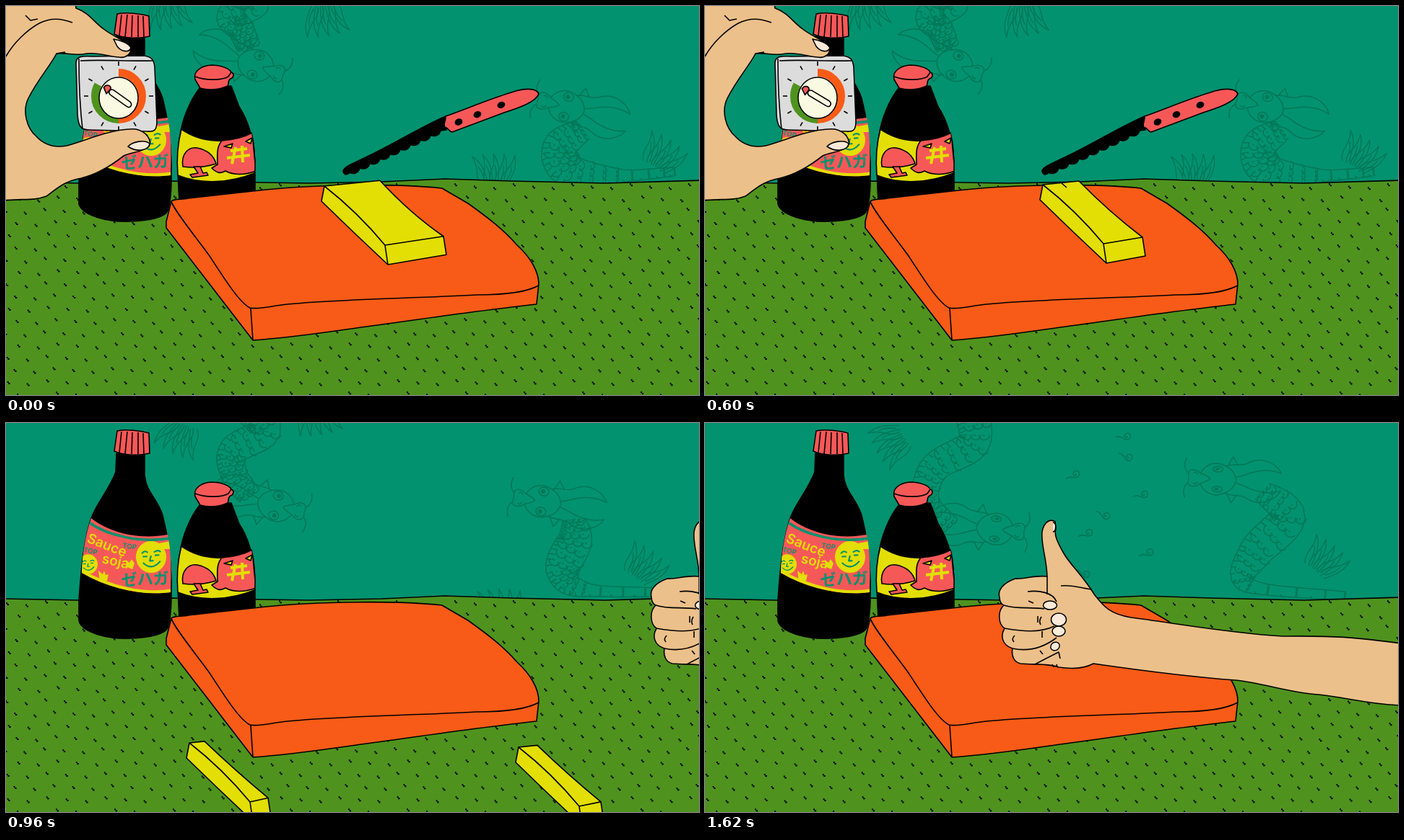
Animation of 960x540 px, one loop 1680 ms. Source, as an HTML page with a canvas:

```html
<!DOCTYPE html>
<html lang="en">
<head>
<meta charset="utf-8">
<title>Kitchen timer</title>
<style>
html, body { margin: 0; width: 100%; height: 100%; overflow: hidden; background: #02926f; }
canvas { display: block; }
</style>
</head>
<body>
<canvas id="stage" width="960" height="540"></canvas>
<script>
const c = document.getElementById('stage').getContext('2d');
const LOOP = 1680, STEP = 60, { PI, sin, cos } = Math;
const WALL = '#02926f', LINE = '#007757', GRASS = '#4f931e', ORANGE = '#f75b17', YELLOW = '#e3de03',
  RED = '#f65858', SKIN = '#ecc08a', GREY = '#dcdcdc', CREAM = '#fafae2', NAIL = '#f9e9d8', BLACK = '#000';

// Share of the span from a to b that has passed, 0 to 1
const part = (t, a, b) => Math.max(0, Math.min(1, (t - a) / (b - a)));

function paint(d, fill, stroke = BLACK, width = 1.6) {
  const p = new Path2D(d);
  if (fill) { c.fillStyle = fill; c.fill(p); }
  if (stroke) { c.strokeStyle = stroke; c.lineWidth = width; c.stroke(p); }
}
function oval(x, y, rx, ry, fill, stroke = BLACK, turn = 0) {
  c.beginPath();
  c.ellipse(x, y, rx, ry, turn, 0, 2 * PI);
  if (fill) { c.fillStyle = fill; c.fill(); }
  if (stroke) { c.strokeStyle = stroke; c.lineWidth = 1.5; c.stroke(); }
}
function group(x, y, turn, draw, scaleX = 1, scaleY = 1) {
  c.save();
  c.translate(x, y);
  c.rotate(turn);
  c.scale(scaleX, scaleY);
  draw();
  c.restore();
}
function word(text, x, y, turn, size, color, font = 'Inter, sans-serif') {
  group(x, y, turn, () => {
    c.font = `600 ${size}px ${font}`;
    c.fillStyle = color;
    c.fillText(text, 0, 0);
  });
}

// Poses: five spine points, then x, y, turn of the head and of one claw
const LEFT = {
  low: [300, -30, 345, -8, 312, 14, 325, 32, 335, 55, 346, 82, 3.5, 222, -8, 3],
  high: [368, -20, 372, 28, 318, 62, 306, 108, 335, 142, 402, 147, 3.25, 272, 20, 4.2],
  width: u => 24 - 8 * u
};
const RIGHT = {
  low: [800, 172, 768, 195, 780, 228, 845, 236, 925, 230, 776, 140, .25, 900, 220, .6],
  high: [772, 95, 808, 130, 762, 180, 752, 225, 885, 240, 710, 78, .05, 848, 202, .7],
  width: u => 14 + 14 * sin(PI * Math.min(1, u * 1.25)) - 8 * u
};

// Catmull-Rom curve through the spine points
function spine(p, u) {
  const i = Math.min(3, Math.floor(u * 4)), f = u * 4 - i;
  return [0, 1].map(k => {
    const [a, b, d, e] = [-1, 0, 1, 2].map(n => p[Math.max(0, Math.min(4, i + n)) * 2 + k]);
    return b + f / 2 * (d - a + f * (2 * a - 5 * b + 4 * d - e + f * (3 * (b - d) + e - a)));
  });
}
function body(p, width) {
  const edges = [new Path2D(), new Path2D()], N = 32;
  for (let i = 0; i <= N; i++) {
    const u = i / N, w = width(u), s = w / 3;
    const [x, y] = spine(p, u), [x0, y0] = spine(p, Math.max(0, u - .01)), [x1, y1] = spine(p, Math.min(1, u + .01));
    const turn = Math.atan2(y1 - y0, x1 - x0);
    edges.forEach((e, k) => e.lineTo(x + sin(turn) * w * (1 - 2 * k), y - cos(turn) * w * (1 - 2 * k)));
    group(x, y, turn, () => {
      c.beginPath();
      c.moveTo(0, w * .6);
      c.lineTo(3, w);
      c.stroke();
      if (i % 2) return;
      for (let k = 0; k < 3; k++) {
        const off = s * (k * 1.6 - 2 + (i % 4 ? .4 : -.2));
        c.beginPath();
        c.arc(0, off, s, -1.5, 1.5);
        c.stroke();
        c.fillRect(0, off, 2, 2);
      }
    });
  }
  edges.forEach(e => c.stroke(e));
}
function claw(x, y, turn) {
  group(x, y, turn, () => {
    for (let n = -2; n <= 2; n++) group(n * 7, 0, n * .2, () =>
      paint('M-5 4C-12-12 2-18-2-40C8-26 6-14 4 4M0 0Q4-14 0-24', null, LINE, 1.4));
  });
}
function dragon({ low, high, width }, rise, blink) {
  const p = low.map((v, k) => v + (high[k] - v) * rise);
  c.strokeStyle = c.fillStyle = LINE;
  c.lineWidth = 1.5;
  body(p, width);
  group(p[10], p[11], p[12], () => {
    for (const side of [1, -1]) group(0, 0, 0, () => {
      paint('M-40 0C-44-14-32-14-24-7C-18-20-4-26 10-19C18-16 24-10 26 0M10-19C26-24 32-18 44-26' +
        'C64-36 84-22 88-12C72-18 56-16 38-8L26-4M-40-6Q-50-14-44-28M-24-7Q-14-4-10 0M14-20L20-32L28-20M-34-7q4-3 6 2', null, LINE, 1.5);
      oval(0, -14, 7, 6 * blink, null, LINE);
      oval(-1, -14, 3, 3 * blink, LINE, null);
    }, 1, side);
  });
  claw(...p.slice(13));
}
function wall(t) {
  c.fillStyle = WALL;
  c.fillRect(0, 0, 960, 540);
  const rise = part(t, 600, 1320), blink = t < 1500 ? 1 : .65;
  dragon(LEFT, rise, blink);
  dragon(RIGHT, rise, blink);
  claw(440 - 20 * rise, 2 - 50 * rise, 3);
  claw(677 + 15 * rise, 245 + 50 * rise, 0);
  if (t >= 780 && t < 900) for (const side of [1, -1])
    group(555 - 115 * side, 112 - 15 * side, 0, () =>
      paint('M-18 4C-8-8 4 0 8-8C24-14 22 2 14 4C24 12 12 12 6 6C-4 0-10 2-18 10M12-4h4', null, LINE, 1.4), side);
  if (t >= 1200) for (let k = 0; k < 8; k++)
    group(560 + 52 * sin(2.3 * k + .4), 20 + 27 * k, sin(k * 2) * .5, () =>
      paint('M-11 0C-4-5 2 7 8 2C13-5 4-9 1-3C0 0 5 1 5-2', null, LINE, 1.5));
}

function table() {
  c.save();
  const top = 'M-3 244L100 246L230 243L420 246L520 244L608 240L700 243L830 246L963 242V543H-3Z';
  paint(top, GRASS);
  c.clip(new Path2D(top));
  c.fillStyle = BLACK;
  for (let row = 0; row < 18; row++)
    for (let col = 0; col < 37; col++) {
      const x = col * 27 + row % 2 * 13.5 + 3 * sin(row * 2), y = 249 + row * 17 + 3 * sin(col * 2.1);
      c.fillRect(x, y, 2, 2);
      c.fillRect(x + 1.5, y + 2, 2.5, 2);
    }
  c.restore();
}

function face(x, y, r) {
  group(x, y, -.05, () => {
    oval(0, 0, 20, 21, YELLOW, null);
    paint('M-12-5q4-5 8-1M4-6q5-4 9 0M-11-1h6M5-2h6M0-2L-2 5h5M-11 7Q0 19 12 6', null, WALL, 2);
  }, r / 20, r / 20);
}
function label(d, fill, stroke, draw) {
  c.save();
  paint(d, fill, stroke);
  c.clip(new Path2D(d));
  draw();
  c.restore();
}
function bigBottle() {
  paint('M153 42L152 68C142 95 121 116 115 142C107 170 104 205 101 245V275C106 291 140 300 172 299' +
    'C200 298 221 293 224 284C230 265 229 240 229 218C228 185 224 155 217 128C209 103 194 96 192 72V42Z', BLACK);
  paint('M154 11C166 8 188 11 198 14L199 42C185 46 162 45 150 39Z', RED);
  paint('M160 12L157 41M168 12L165 43M175 13L174 43M183 13V43M190 14L191 43', null);
  label('M118 132C140 150 180 163 224 155C229 180 229 205 228 235C190 240 145 231 105 208C106 180 110 155 118 132Z', RED, null, () => {
    paint('M115 138C140 156 185 167 227 160', null, WALL, 3.5);
    paint('M190 170Q210 168 228 164V175H200Z', YELLOW, null);
    paint('M104 206C145 229 190 239 229 233', null, YELLOW, 5);
    face(201, 186, 21);
    face(114, 196, 13);
    paint('M128 205l6 5l2-5l2 6l4-1l-2 9l-10 1ZM166 190l5 4l3-5l4 6l-3 8l-7-3Z', YELLOW, null);
    word('Sauce', 111, 165, .38, 19, YELLOW);
    word('soja', 132, 194, .22, 19, YELLOW);
    word('TOP', 161, 173, .15, 9.5, WALL);
    word('TOP', 107, 179, .2, 9.5, WALL);
    word('ゼハガ', 160, 226, -.04, 22, WALL, '"Noto Sans CJK JP", "Noto Sans CJK", sans-serif');
  });
}
function smallBottle() {
  paint('M269 113C255 130 244 158 241 180C236 205 238 235 240 270H345V215C343 185 335 158 323 140L312 111Z', BLACK);
  paint('M262 102C259 91 270 83 284 82C298 82 310 87 312 92C317 94 315 100 311 101C307 103 309 108 307 111C295 117 280 117 269 114Z', RED);
  paint('M262 98C277 104 300 103 308 98L312 92', null);
  label('M243 171C270 190 310 193 340 176C345 195 345 215 344 232C310 246 270 248 238 235C236 210 238 190 243 171Z', YELLOW, BLACK, () => {
    paint('M299 187C313 186 328 183 341 176L346 229C332 235 315 235 304 229C297 233 292 232 285 225L293 220C293 208 291 196 299 187Z', RED);
    paint('M245 223C242 205 253 195 265 197C279 200 288 208 291 219C275 224 260 225 245 223Z', RED);
    paint('M260 223L266 232L255 234L258 238L280 235L278 231L273 232L269 223Z', RED);
    paint('M302 195l12-4l-2 6ZM332 188l9-5l-2 8Z', YELLOW);
    paint('M311 201L334 198M306 211L338 207M318 196L313 219M327 194L328 217', null, YELLOW, 4);
  });
}
function board() {
  paint('M229 271C233 267 244 269 252 267L360 255C430 248 540 246 604 253L640 274C668 294 690 311 708 332' +
    'C728 350 738 370 738 386L735 414C660 422 580 434 500 445C440 453 400 460 342 464L222 308V299Z', ORANGE);
  paint('M229 271C231 281 260 317 282 347C306 384 324 412 338 419C350 422 368 416 390 414C460 407 560 406 652 401C700 401 723 396 738 388M339 420L342 464', null);
}

function bar(x, y, w) {
  const right = w + 88, drop = 79 - .12 * w;
  group(x, y, 0, () => {
    paint(`M0 0L${w} ${-.1 * w}Q${w + 42} 38 ${right} ${drop}L${right + 4} ${106 - .14 * w}L88 109Q42 66-4 21Z`, YELLOW);
    paint(`M0 0Q46 36 84 82L${right} ${drop}M84 82L88 109`, null);
  });
}
// A cut piece slides sideways while it drops faster and faster
function slide(x, y, w, vx, vy, p) {
  bar(x + vx * p, y + vy * p * p, w);
}
function butter(t) {
  if (t < 180) bar(441, 250, 77);
  else if (t < 720) {
    bar(468, 248, 50);
    if (t >= 480) paint('M494 246L501 252', null);
    slide(441, 250, 25, -154, 177, (t - 180) / 240);
  } else {
    slide(492, 246, 26, 109, 51, (t - 720) / 120);
    slide(468, 248, 21, -107, 49, (t - 720) / 120);
  }
}
function knife(t) {
  if (t >= 840) return;
  const cut = (1 - cos(2 * PI * t / 300)) / 2, away = part(t, 720, 830) ** 2;
  const dx = cut * (t < 300 ? -17 : 15) + 560 * away, dy = 35 * cut - 4 - 130 * away;
  c.save();
  // The blade sinks behind the near side of the cut
  c.clip(new Path2D(`M0-60H960V540H${dx + 800}L${dx + 479} 250H0Z`));
  c.translate(dx, dy);
  paint('M467 234C466 228 480 223 494 216C532 199 570 174 609 157L610 176L602 177' + 'q-3 10-14 6.5'.repeat(9) + 'Q470 241 467 234Z', BLACK);
  paint('M609 157C640 146 670 133 700 124C716 118 735 117 738 126C734 137 712 145 690 152L618 179C613 178 613 173 608 172C605 168 610 163 609 157Z', RED);
  for (const x of [627, 653, 686]) oval(x, 165 - (x - 627) * .4, 5.5, 4.5, BLACK, null, -.4);
  c.restore();
}

function timer(turn) {
  paint('M97 79C97 70 105 69 120 70L190 69C203 70 205 76 206 85L209 160C209 172 206 175 195 174L115 172C103 172 100 166 99 150Z', GREY);
  paint('M101 73C101 110 103 145 106 171M103 76C130 74 170 77 203 76', null);
  const arc = (from, to, color) => {
    c.lineWidth = 11;
    c.strokeStyle = color;
    c.beginPath();
    c.arc(156, 125, 32.5, from, to);
    c.stroke();
  };
  arc(-PI / 2, PI / 2, ORANGE);
  arc(PI / 2, 3.65, GRASS);
  for (let k = 0; k < 12; k++) group(156, 125, k * PI / 6, () => paint('M0-42V-48', null));
  oval(156, 127.5, 27, 28.5, CREAM);
  group(158, 128, turn, () => {
    paint('M-14-4H14C20-3 20 4 14 4H-14C-19 3-19-3-14-4Z', CREAM);
    paint('M-27 1C-27-6-20-7-18-3L-19 6Z', RED);
  });
}
function timerHand(t) {
  if (t >= 900) return;
  group(-250 * part(t, 660, 900) ** 2, 0, 0, () => {
    timer(t < 60 ? .62 : .54);
    paint('M-3-3H96L97 3C114 9 122 22 134 31C146 41 164 47 172 57C175 66 166 73 156 71C143 71 130 64 112 66C95 70 84 64 70 66' +
      'C62 82 44 102 31 128C22 146 29 170 42 181C54 194 68 197 84 194C105 188 122 181 137 177C152 173 168 170 180 171' +
      'C194 174 203 186 198 195C190 203 172 203 163 208C144 223 126 234 104 239C82 243 72 252 56 264C38 271 22 267-3 270Z', SKIN);
    paint('M0 70C10 52 28 34 46 24C62 16 76 17 92 23M27 13L34 20L44 18M70 66L82 64', null);
    paint('M149 46C158 47 170 52 173 58C171 65 160 64 154 56Z', NAIL);
    paint('M169 195C176 188 192 185 199 191C198 200 182 204 169 195Z', NAIL);
  });
}

function thumbsUp(t) {
  if (t < 930) return;
  group(772 * (1 - part(t, 900, 1320)) ** 3, 0, 0, () => {
    paint('M485 137C478 132 469 138 467 151C465 168 473 186 474 213C456 211 443 217 430 216C413 222 405 232 408 242' +
      'C408 248 411 252 414 253C405 261 406 279 415 285C409 295 411 308 426 313C424 323 428 332 437 334' +
      'C455 336 475 333 490 339C510 342 525 341 538 334C600 343 680 353 735 357C775 361 805 374 850 377C890 381 915 390 965 392' +
      'V306C900 298 880 295 800 296C720 291 640 276 590 270C560 265 552 254 540 239C522 210 506 197 497 181C489 167 483 155 486 147Z', SKIN);
    paint('M474 213L474 238M447 234C462 232 482 235 487 248M414 253C432 259 452 255 470 258M415 285C438 289 463 292 484 282' +
      'M426 313C450 318 470 311 487 298M457 335C472 327 482 322 490 318L492 327M493 226C510 224 524 230 536 231', null);
    paint('M448 247l7 3M466 269q-4 6-1 11M461 268v9M467 289v9M429 295q-5 5-1 9M464 316l4 5M481 335l2 4M487 335l1 4', null);
    paint('M482 138C488 139 486 151 482 151', NAIL);
    oval(478, 253, 9.5, 6, NAIL);
    oval(490, 273, 10.5, 9, NAIL);
    oval(490, 289, 9, 7, NAIL);
    oval(485, 310, 6.5, 5.5, NAIL, BLACK, -.6);
  });
}

function draw(t) {
  wall(t);
  table();
  bigBottle();
  smallBottle();
  board();
  butter(t);
  knife(t);
  timerHand(t);
  thumbsUp(t);
}
function tick() {
  draw(Math.floor(performance.now() % LOOP / STEP) * STEP);
  requestAnimationFrame(tick);
}
c.lineJoin = 'round';
tick();
</script>
</body>
</html>
```
